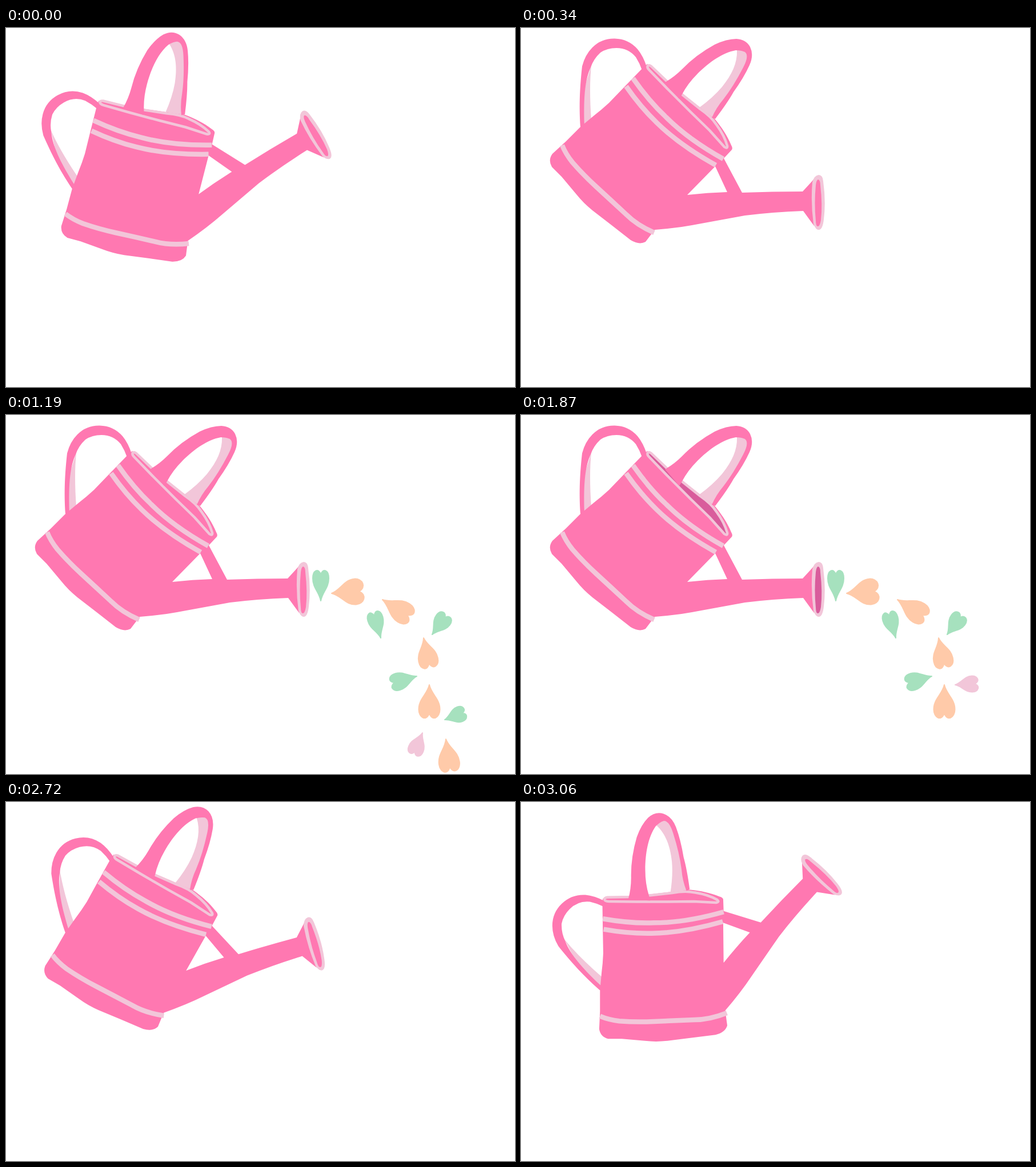
These frames come from a looping animation (891 by 628 pixels, 3230 ms). An HTML page:

```html
<!DOCTYPE html>
<html lang="en">
<head>
<meta charset="utf-8">
<title>Watering can</title>
<style>
  html, body { margin: 0; width: 100%; height: 100%; overflow: hidden; background: #fff; }
  svg { display: block; width: 100%; height: 100%; }
  .pink { fill: #ff78b1; }
  .light { fill: #f2c6d9; }
  .line { fill: none; stroke: #f2c6d9; }
</style>
</head>
<body>
<svg viewBox="0 0 891 628">
  <g id="can">
    <!-- inner faces of the two handles -->
    <path class="light" d="M123 66Q119 105 123 161L108 174L106 120Z"/>
    <path class="light" d="M378 39L392 38L401 50L388 80L337 160L311 140Q336 122 352 103C369 82 379 61 378 39Z"/>
    <!-- back handle -->
    <path class="pink" d="M104 173C102 143 102 112 107 67Q112 47 125 34Q141 18 164 18.500Q188 19 204 37Q214 49 220 68L212 74Q208 62 201 51Q188 35 167 35Q151 35 139 43Q127 54 122 69C113 88 109 117 111 171Z"/>
    <!-- body, strut and spout -->
    <path class="pink" d="M212 71L180 104L154 131Q141 143 128 153L104 173L78 199L55 220Q47 231 54 243L71 260L97 291Q109 306 125 319L160 346L192 371Q207 380 218 374L234 353Q275 350 310 343L392 328Q440 322 494 320L513 346L514 263L493 286Q440 286 387 288L355 228L369 213Q371 210 368 205C361 188 352 175 340 160L283 115L221 63Z
      M340 242L361 287Q326 288 291 292Z" fill-rule="evenodd"/>
    <!-- stripes -->
    <g class="line" stroke-width="8.500">
      <path d="M196 88Q224 128 254 156Q293 195 354 229"/>
      <path d="M184 102Q209 138 238 166Q278 205 341 240"/>
      <path d="M72 205Q78 220 90 235Q109 257 132 278L157 301L184 326Q203 345 233 358"/>
    </g>
    <!-- rim -->
    <path class="inside line" stroke-width="4.500" stroke-linejoin="round" d="M222 66Q224 64 228 67L256 94L284 118L314 142Q333 155 342 169Q356 188 361 206Q362 212 356 208L330 179L297 147L258 108L225 74Q220 69 222 66Z"/>
    <!-- top handle -->
    <path class="pink" d="M252 95Q268 86 282 72Q306 47 339 29Q360 19 377 19Q394 20 401 33Q408 47 400 65Q390 87 372 112Q362 130 340 159L334 157Q342 139 354 125Q372 102 389 69Q400 48 392 42Q386 39 376 39C353 43 329 60 309 80Q292 97 282 116L277 124Z"/>
    <!-- rose -->
    <path class="light" d="M521 257Q528 257 529 268Q534 304 530 335Q528 353 521 353Q516 353 512 343Q507 305 510 270Q513 258 521 257Z"/>
    <path class="inside" d="M520 265Q524 266 524 275Q528 310 525 336Q523 347 520 347Q516 347 516 337Q513 306 516 275Q517 266 520 265Z"/>
  </g>
  <g id="hearts"></g>
</svg>
<script>
const STEP = 170, STEPS = 19, TOP = 7;
const PINK = '#ff78b1', DARK = '#d95c9c';
const GREEN = '#a6e1be', ORANGE = '#ffcaa9', LILAC = '#f2c6d9';

// upright to fully tipped: angle and the place of the point (312, 276)
const poses = [[-45, 358.2, 255.2], [-30, 347.4, 266.5], [-15, 331.4, 274.1], [0, 312, 276]];

// colour, tip x, tip y, direction, length, width, first level, last level
const hearts = [
  [GREEN, 551, 325, -90, 53, 28, 3, TOP],
  [ORANGE, 570, 312, -4, 56, 45, 3, TOP],
  [ORANGE, 659, 323, 32, 59, 38, 4, TOP],
  [GREEN, 656, 390, -106, 47, 27, 4, TOP],
  [LILAC, 708, 313, -60, 41, 27, 4, 4],
  [GREEN, 746, 384, -53, 43, 29, 5, TOP],
  [ORANGE, 731, 390, 78, 53, 34, 5, TOP],
  [LILAC, 709, 411, 131, 41, 27, 5, 5],
  [GREEN, 719, 457, 164, 47, 30, 6, TOP],
  [ORANGE, 741, 472, 90, 58, 37, 6, TOP],
  [LILAC, 760, 472, -3, 40, 28, 6, 6],
  [GREEN, 768, 533, -20, 38, 27, 7, TOP],
  [ORANGE, 770, 567, 82, 57, 36, 7, TOP],
  [LILAC, 729, 556, 112, 41, 27, 7, 7]
];

function heartPath(len, width) {
  const h = width / 2;
  const p = (x, y) => (x * len).toFixed(1) + ' ' + (y * h).toFixed(1);
  return `M0 0C${p(.3, -.22)} ${p(.42, -1)} ${p(.74, -1)}C${p(1, -1)} ${p(1.11, -.28)} ${p(.86, 0)}` +
    `C${p(1.11, .28)} ${p(1, 1)} ${p(.74, 1)}C${p(.42, 1)} ${p(.3, .22)} 0 0Z`;
}

const can = document.getElementById('can');
const insides = document.querySelectorAll('.inside');
const drops = hearts.map(([color, x, y, angle, len, width, from, to]) => {
  const el = document.createElementNS('http://www.w3.org/2000/svg', 'path');
  const attrs = {
    d: heartPath(len, width), fill: color, stroke: color, 'stroke-width': 2,
    'stroke-linejoin': 'round', transform: `translate(${x} ${y}) rotate(${angle})`
  };
  for (const key in attrs) el.setAttribute(key, attrs[key]);
  document.getElementById('hearts').append(el);
  return { el, from, to };
});

function draw(time) {
  const step = Math.floor(time / STEP) % STEPS;
  // tips and pours, holds, then runs backwards to upright (-1)
  const level = Math.min(step, TOP, STEPS - 2 - step);
  const [angle, x, y] = poses[Math.min(level + 1, 3)];
  can.setAttribute('transform', `translate(${x} ${y}) rotate(${angle}) translate(-312 -276)`);
  for (const el of insides) el.style.fill = level === 6 ? DARK : PINK;
  for (const { el, from, to } of drops)
    el.style.display = level >= from && level <= to ? '' : 'none';
}

const start = performance.now();
function loop() {
  draw(performance.now() - start);
  requestAnimationFrame(loop);
}
loop();
</script>
</body>
</html>
```
